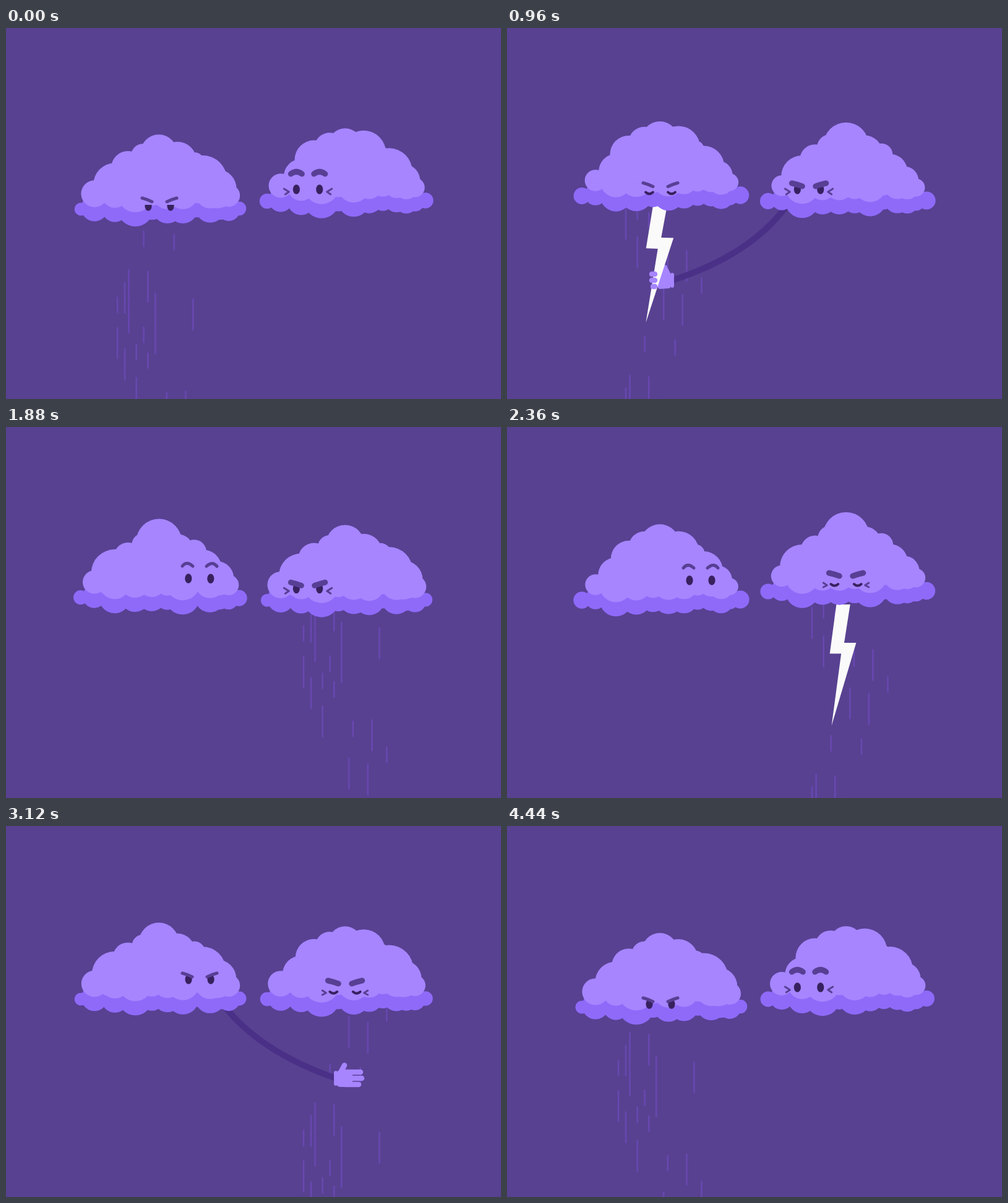
These frames come from a looping animation (800x600 px, 4480 ms). An HTML page with a canvas:

```html
<!DOCTYPE html>
<html lang="en">
<head>
<meta charset="utf-8">
<title>Two clouds, one bolt</title>
<style>
html, body { margin: 0; width: 100%; height: 100%; overflow: hidden; background: #584191; }
canvas { display: block; width: 800px; height: 600px; }
</style>
</head>
<body>
<canvas id="stage" width="800" height="600"></canvas>
<script>
const ctx = document.getElementById('stage').getContext('2d');
const LOOP = 4480, HALF = LOOP / 2, FRAME = 40, TAU = Math.PI * 2;
const BG = '#584191', LIGHT = '#a685ff', DARK = '#8f6af9', BROW = '#583f94',
      EYE = '#38215f', RAIN = '#6848b0', ARM = '#4a3187', BOLT = '#fafafa';

const mod = (a, n) => ((a % n) + n) % n;
const rad = d => d * Math.PI / 180;
const mix = (a, b, u) => a + (b - a) * u;
const mixAll = (a, b, u) => a.map((v, i) => mix(v, b[i], u));
const noise = n => mod(Math.sin(n * 12.9898) * 43758.5453, 1);

// Timing: a rise from a to b, a rise and fall, a short bump.
function ease(t, a, b) {
  const u = Math.min(1, Math.max(0, (t - a) / (b - a)));
  return u * u * (3 - 2 * u);
}
const gate = (t, a, b, c, d) => ease(t, a, b) * (1 - ease(t, c, d));
const bump = (t, at, w) => gate(t, at - w, at, at, at + w);
// Walks through poses, each step by its own amount.
const blend = (poses, steps) =>
  steps.reduce((pose, u, i) => mixAll(pose, poses[i + 1], u), poses[0]);

// Puffs relative to the middle of a cloud's base: x, y, radius (and pulse phase).
const TOPS = [[-73,-40,33,.2], [-52,-67,27,.75], [-27,-86,22,.66], [-2,-91,32,.32],
              [28,-78,31,.75], [55,-75,17,.25], [69,-48,34,.92], [92,-33,27,.02]];
const BASE = [[-128,0,12], [-106,-2,19], [-73,0,24], [-40,-1,26], [-13,-1,20], [12,-1,23],
              [37,-1,24], [59,-1,15], [81,-2,22], [97,2,17], [111,1,16], [128,-1,13]];
const SHAPE = [[-11,0], [12,0], [2,64], [22,64], [-19,202], [-3,82], [-22,82]];
const FIST = [[4, -9], [11, -23], [23, -5], [24, 8], [20, 12], [5, 11]];

const left = {
  cx: 249, dir: 1, start: 0, phase: 0, rest: [-1, -5], watch: [64, -32],
  gap: 18, brow: 5, marks: false, lift: -6,
  scowl: [[-10, -10], [-2, -8], [6, -4]], arch: [[-10, -20], [-3, -29], [7, -20]]
};
const right = {
  cx: 550, dir: -1, start: HALF, phase: .22, rest: [-2, -11], watch: [-62, -19],
  gap: 18.7, brow: 9, marks: true, lift: -9,
  scowl: [[-9, -10], [0, -8], [8, -5]], arch: [[-9, -25], [0, -32], [9, -25]]
};

function fill(color, build) {
  ctx.fillStyle = color;
  ctx.beginPath();
  build();
  ctx.fill();
}
function stroke(color, width, build) {
  ctx.strokeStyle = color;
  ctx.lineWidth = width;
  ctx.lineCap = ctx.lineJoin = 'round';
  ctx.beginPath();
  build();
  ctx.stroke();
}
function disc([x, y, r]) {
  ctx.moveTo(x + r, y);
  ctx.arc(x, y, r, 0, TAU);
}
function poly(pts) {
  pts.forEach(([x, y], i) => i ? ctx.lineTo(x, y) : ctx.moveTo(x, y));
  ctx.closePath();
}
function line(x1, y1, x2, y2) {
  ctx.moveTo(x1, y1);
  ctx.lineTo(x2, y2);
}
function curve(a, b, c) {
  ctx.moveTo(...a);
  ctx.quadraticCurveTo(...b, ...c);
}
function layer(build) {
  ctx.save();
  build();
  ctx.restore();
}

// Every puff swells three times per loop.
const swell = (r, depth, phase, t) => r * (1 + depth * Math.cos(TAU * (3 * t / LOOP - phase)));

// How far the bolt is pulled over, and how far it is then carried off.
const pulled = q => ease(q, 1440, 1600);
const carried = q => ease(q, 1660, 1800);

function drawRain(c, q) {
  const wet = 1 - gate(q, 1500, 1780, 3720, 4000);
  if (wet <= 0) return;
  const top = 262, span = 398;
  layer(() => {
    ctx.globalAlpha = wet;
    stroke(RAIN, 2.6, () => {
      for (let i = 0; i < 21; i++) {
        const col = 1 + i % 14;
        const x = c.cx - 81 + 30.6 * Math.floor(col / 3) + 12 * (col % 3);
        const y = top + mod((noise(i + 3) + q / 280) * span, span);
        line(x, y + 1, x, y + (i % 5 < 3 ? 50 : 25));
      }
    });
  });
}

function handPose(s) {
  return blend([[330, 285, 40], [533, 408, 0], [327, 316, 90], [300, 262, 90]],
    [ease(s, 600, 840), pulled(s), carried(s)]);
}
function atHand(s, build) {
  const [x, y, turn] = handPose(s);
  layer(() => {
    ctx.translate(x, y);
    ctx.rotate(rad(turn));
    build();
  });
}

function drawHand(s) {
  const [x, y] = handPose(s);
  const [sx, bx, by] = blend([[350, 345, 290], [352, 410, 365], [320, 375, 400], [305, 310, 300]],
    [ease(s, 600, 840), ease(s, 880, 1400), pulled(s)]);
  if (s < 1580) stroke(ARM, 10, () => curve([sx, 290], [bx, by], [x, y]));
  atHand(s, () => {
    if (s < 950) {
      fill(LIGHT, () => ctx.roundRect(1, -13, 26, 27, 6));
      stroke(LIGHT, 8.5, () => {
        line(15, -10, 40, -10);
        line(15, 0, 42, 0);
        line(15, 10, 37, 10);
        line(7, -8, 14, -21);
      });
    } else {
      fill(LIGHT, () => poly(FIST));
      stroke(LIGHT, 4, () => poly(FIST));
    }
    fill(LIGHT, () => ctx.roundRect(-3, -12, 6, 24, 3));
  });
}

function drawKnuckles(s) {
  atHand(s, () => stroke(LIGHT, 8.5, () =>
    [-10, 0, 10].forEach(k => line(28, k, k > 5 ? 31 : 33, k))));
}

// Two flashes, then a bolt that stays long enough to be caught.
function drawBolt(c, s) {
  const flash = gate(s, 60, 120, 180, 240) + gate(s, 430, 500, 570, 640);
  const held = ease(s, 890, 950);
  const size = flash * .97 + held * (1 - .4 * carried(s));
  if (size < .01) return;
  const [dx, y, turn] = blend([[0, 275, 0], [97, 336, 86], [260, 270, 86]], [pulled(s), carried(s)]);
  layer(() => {
    ctx.translate(c.cx + c.dir * (dx + 7 * (1 - ease(s, 240, 430))), y + 12 * flash);
    ctx.rotate(rad(1.6 * held - c.dir * turn));
    ctx.scale(size, size);
    fill(BOLT, () => poly(SHAPE));
  });
}

// The partner of c reaches for the bolt that c makes.
function drawGrab(c, s) {
  if (s >= 1800) return;
  const mirrored = draw => layer(() => {
    if (c === left) {
      ctx.translate(800, 0);
      ctx.scale(-1, 1);
    }
    draw(s);
  });
  if (s > 600) mirrored(drawHand);
  drawBolt(c, s);
  if (s >= 950) mirrored(drawKnuckles);
}

function drawEye(open) {
  if (open < .1) {
    stroke(EYE, 3.8, () => curve([-6, -1], [0, 4.5], [6, -1]));
    return;
  }
  layer(() => {
    ctx.beginPath();
    ctx.rect(-10, 8 - 20 * open, 20, 30);
    ctx.clip();
    fill(EYE, () => ctx.ellipse(0, 0, 5.6, 7.8, 0, 0, TAU));
  });
}

function drawFace(c, q) {
  const late = q < 720 ? q + LOOP : q;
  const open = gate(late, 1440, 1520, 4440, 4520);
  const raise = gate(q, 1440, 1560, 2500, 2640);
  const [x, y] = mixAll(c.rest, c.watch, gate(q, 1440, 1580, 4160, 4320));
  const shut = 1 - open;
  const brow = c.scowl.map(([bx, by], i) => mixAll([bx, by + c.lift * shut], c.arch[i], raise));
  for (const side of [-1, 1]) layer(() => {
    ctx.translate(x + side * c.gap, y);
    ctx.scale(-side, 1);
    drawEye(open);
    stroke(BROW, c.brow, () => curve(...brow));
    if (c.marks) stroke(BROW, 3, () => {
      ctx.moveTo(-20 + 2 * shut, -1 - 2 * shut);
      ctx.lineTo(-12, 4 - 3 * shut);
      ctx.lineTo(-18, 8 - 4 * shut);
    });
  });
}

function drawCloud(c, q, t) {
  const late = q < 720 ? q + LOOP : q;
  const pull = gate(q, 1440, 1600, 1660, 1740);
  const tug = gate(q, 3680, 3840, 3900, 4020);
  const snap = bump(q, 1780, 120);
  const crouch = gate(late, 4100, 4300, 4520, 4580);
  const hop = 14 * bump(q, 120, 90) + 9 * bump(q, 470, 60) + 9 * bump(q, 950, 70);
  const top = TOPS.map(([x, y, r, p]) => [x, y, swell(r, .17, p + c.phase, t)]);
  const base = BASE.map(([x, y, r], i) => [x, y, swell(r, .14, .45 * (i - 1) + c.phase, t)]);
  layer(() => {
    ctx.translate(c.cx + c.dir * (63 * pull + 4 * tug - 6 * snap),
      280 + 13 * crouch - hop + 42 * pull - 45 * snap);
    ctx.rotate(rad(-c.dir * (28.8 * pull + 6 * tug - 6 * snap)));
    ctx.scale(1 - .035 * pull, 1 - .035 * pull);
    fill(DARK, () => {
      base.forEach(disc);
      ctx.rect(-106, -18, 218, 20);
    });
    fill(LIGHT, () => {
      top.forEach(disc);
      base.slice(1, -1).forEach(([x, y, r]) => disc([x, y - 23, r]));
    });
    fill(LIGHT, () => poly([[-115, -20], [0, -85], [115, -20]]));
    drawFace(c, q);
  });
}

function draw(t) {
  ctx.fillStyle = BG;
  ctx.fillRect(0, 0, 800, 600);
  const clouds = [left, right];
  const phase = c => mod(t - c.start, LOOP);
  clouds.forEach(c => drawRain(c, phase(c)));
  clouds.forEach(c => drawGrab(c, phase(c)));
  clouds.forEach(c => drawCloud(c, phase(c), t));
}

const began = performance.now();
function tick() {
  const t = Math.max(0, performance.now() - began) % LOOP;
  draw(Math.floor(t / FRAME) * FRAME);
  requestAnimationFrame(tick);
}
tick();
</script>
</body>
</html>
```
